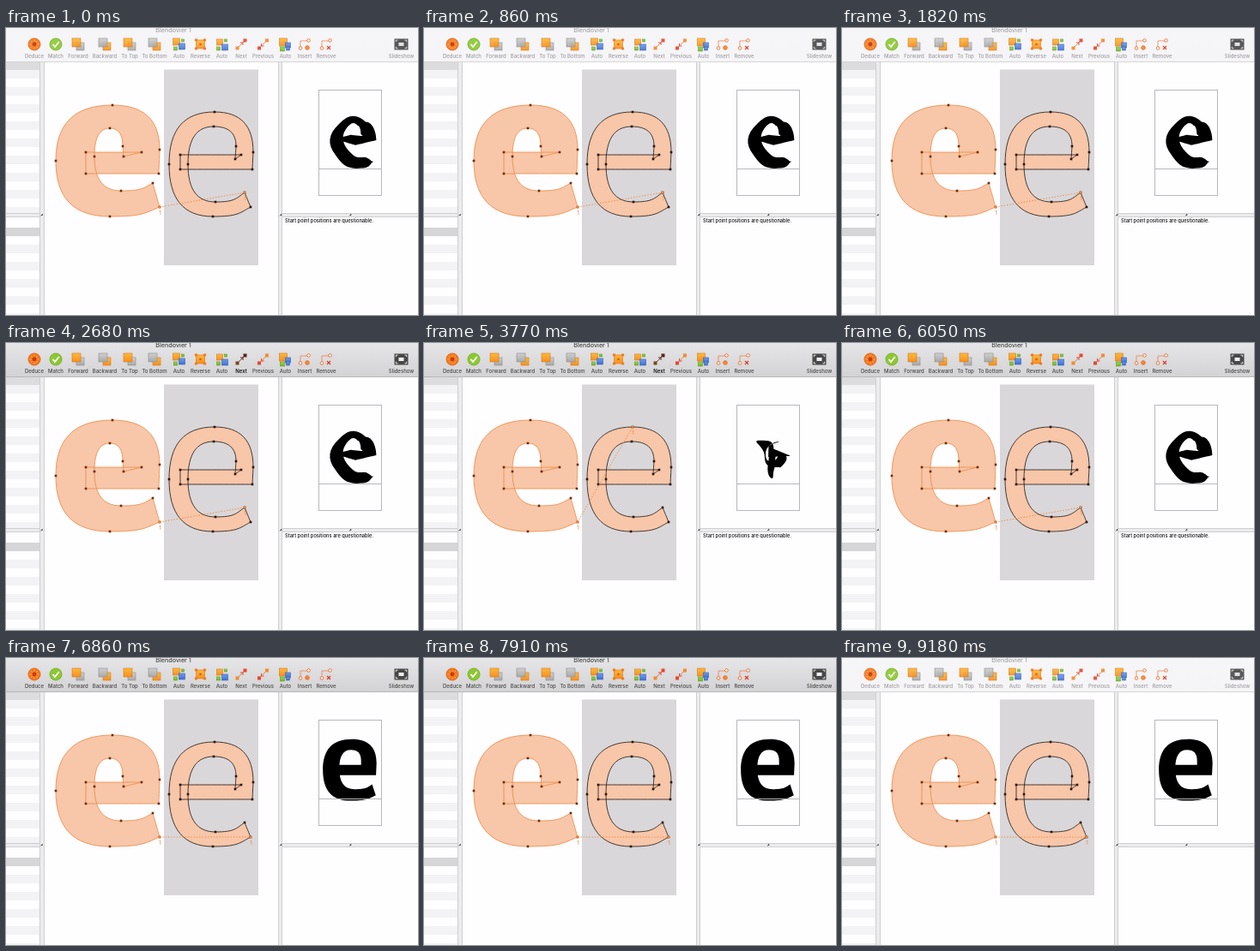
An HTML page with a canvas that plays this animation: 480 px wide and 335 px high, repeating every 9220 ms.

```html
<!DOCTYPE html>
<html lang="en">
<head>
<meta charset="utf-8">
<title>Glyph start points</title>
<style>
html, body { margin: 0; width: 100%; height: 100%; overflow: hidden; background: #fff; }
canvas { display: block; width: 480px; height: 335px; }
</style>
</head>
<body>
<canvas id="stage"></canvas>
<script>
const W = 480, H = 335, LOOP = 9220;
const canvas = document.getElementById('stage');
const ctx = canvas.getContext('2d');
const dpr = window.devicePixelRatio || 1;
canvas.width = W * dpr;
canvas.height = H * dpr;

// Window focus span, and the moments at which "Next" is released
const FOCUS = [2300, 8250];
const CLICKS = [2780, 3030, 3290, 3540, 3800, 4030, 4260, 4480, 4700, 4920, 5140, 5360, 5580, 5800, 6010, 6300];
const PRESS = 110;

// Tangent per node: h horizontal, v vertical, c corner
const TANGENTS = 'chvhvcccccvhvhc';
const CURVED = [0, 1, 2, 3, 10, 11, 12, 13];
const COUNT = TANGENTS.length;

const bold = makeGlyph([[179, 209], [121, 220], [58, 155], [124, 90], [179, 142], [178, 170], [93, 170],
  [93, 145], [158, 145], [137, 150], [136, 138], [121, 117], [103, 150], [134, 190], [171, 181]]);
const light = makeGlyph([[285, 209], [241, 220], [190, 159], [243, 98], [288, 145], [287, 165], [203, 165],
  [203, 148], [274, 148], [267, 153], [268, 138], [242, 115], [212, 159], [244, 203], [278, 192]]);

function handle(i, from, to) {
  const dx = to[0] - from[0], dy = to[1] - from[1];
  const [kx, ky] = { h: [0.67, 0], v: [0, 0.67], c: [0.3, 0.64] }[TANGENTS[i]];
  return [from[0] + dx * kx, from[1] + dy * ky];
}

// Each segment is [start, handle, handle, end]; straight ones have retracted handles
function makeGlyph(nodes) {
  return nodes.map((p, i) => {
    const j = (i + 1) % COUNT, q = nodes[j];
    return CURVED.includes(i) ? [p, handle(i, p, q), handle(j, q, p), q] : [p, p, q, q];
  });
}

function blend(shift) {
  const scale = 0.571, ox = 364.6, oy = 41;
  return bold.map((seg, i) => seg.map((a, n) => {
    const b = light[(i + shift) % COUNT][n];
    return [ox + scale * (a[0] - 48 + b[0] - 184) / 2, oy + scale * (a[1] + b[1]) / 2];
  }));
}

function trace(glyph) {
  ctx.beginPath();
  ctx.moveTo(...glyph[0][0]);
  for (const [, a, b, end] of glyph) ctx.bezierCurveTo(...a, ...b, ...end);
  ctx.closePath();
}

function rect(x, y, w, h, fill, stroke) {
  if (fill) { ctx.fillStyle = fill; ctx.fillRect(x, y, w, h); }
  if (stroke) { ctx.strokeStyle = stroke; ctx.strokeRect(x, y, w, h); }
}

function circle(x, y, r, fill, stroke) {
  ctx.beginPath();
  ctx.arc(x, y, r, 0, Math.PI * 2);
  if (fill) { ctx.fillStyle = fill; ctx.fill(); }
  if (stroke) { ctx.strokeStyle = stroke; ctx.stroke(); }
}

function line(points, color, width = 1) {
  ctx.beginPath();
  points.forEach(p => ctx.lineTo(...p));
  ctx.strokeStyle = color;
  ctx.lineWidth = width;
  ctx.stroke();
  ctx.lineWidth = 1;
}

function text(str, x, y, size, color, align = 'center') {
  ctx.font = `500 ${size}px Inter, Roboto, sans-serif`;
  ctx.textAlign = align;
  ctx.fillStyle = color;
  ctx.fillText(str, x, y);
}

const TILES = {
  orange: ['#ffb83a', '#f78f1e', '#cf7c20'],
  blue: ['#6c9cf0', '#3f6fd0', '#3860b0'],
  green: ['#9bd548', '#72b52a', '#5f9a24'],
  gray: ['#cfcfcf', '#a8a8a8', '#8c8c8c']
};

function tile(x, y, size, kind) {
  const [top, bottom, edge] = TILES[kind];
  const g = ctx.createLinearGradient(0, y, 0, y + size);
  g.addColorStop(0, top);
  g.addColorStop(1, bottom);
  ctx.lineWidth = 0.6;
  rect(x, y, size, size, g, edge);
  ctx.lineWidth = 1;
}

function stack(back, front) {
  tile(-2, -2, 9, back);
  tile(-7, -7, 10, front);
}

// Icons are drawn around their centre
const icons = {
  deduce() {
    circle(0, 0, 7, '#f4781e', '#e0681c');
    for (let a = 0; a < 8; a++) {
      const c = Math.cos(a * Math.PI / 4), s = Math.sin(a * Math.PI / 4);
      line([[c * 3.4, s * 3.4], [c * 5.6, s * 5.6]], '#ffb04a', 1);
    }
    circle(0, 0, 2.4, '#c83c14');
  },
  match() {
    circle(0, 0, 7, '#8cc832', '#7ab42c');
    line([[-3.5, 0], [-1, 3], [3.8, -3]], '#fff', 1.8);
  },
  forward() { stack('gray', 'orange'); },
  backward() { stack('orange', 'gray'); },
  toTop() { stack('gray', 'orange'); },
  toBottom() { stack('orange', 'gray'); },
  autoOrder() { tile(-7, -7, 8, 'orange'); tile(0, -1, 7, 'blue'); tile(-6, 3, 4, 'green'); tile(3, -6, 3, 'green'); },
  reverse() {
    tile(-5, -5, 10, 'orange');
    for (const x of [-5, 5]) for (const y of [-5, 5]) circle(x, y, 1.8, '#f07a1c');
    circle(0, 0, 1.3, '#d8581a');
  },
  autoStart() { tile(-6, -6, 7, 'orange'); tile(0, 0, 7, 'blue'); tile(-6, 3, 4, 'green'); tile(3, -6, 3, 'green'); },
  next(dark) {
    const red = dark ? '#5e2418' : '#e8452c';
    line([[-4, 4], [4, -4]], dark ? '#5a4a40' : '#d0805c');
    rect(-6.5, 2.5, 4, 4, dark ? '#7a4518' : '#f58a2a');
    rect(2.5, -6.5, 4, 4, red);
    line([[-1, -2], [2, -2], [2, 1]], red);
  },
  previous() {
    line([[-4, 4], [4, -4]], '#d0805c');
    rect(-6.5, 2.5, 4, 4, '#e8452c');
    rect(2.5, -6.5, 4, 4, '#f58a2a');
    line([[-2, -1], [-2, 2], [1, 2]], '#e8452c');
  },
  autoPoint() { tile(-7, -7, 9, 'orange'); tile(0, -2, 6, 'blue'); tile(-6, 3, 5, 'green'); tile(1, 3, 4, 'blue'); },
  bend() {
    line([[-5, 5], [-5, -4], [5, -4]], '#e89468');
    circle(-5, 4.5, 1.8, '#fff', '#ee7030');
    circle(4.5, -4.5, 1.8, '#fff', '#ee7030');
  },
  insert() { icons.bend(); circle(3, 4, 2.3, '#f58a2a', '#ee7030'); },
  remove() {
    icons.bend();
    line([[1, 2], [5, 6]], '#e23c28', 1.3);
    line([[5, 2], [1, 6]], '#e23c28', 1.3);
  },
  slideshow() {
    rect(-8, -6.5, 16, 13, '#484848');
    rect(-3, -2, 6, 4, '#f0f0f0');
    for (const x of [-1, 1]) for (const y of [-1, 1])
      line([[x * 4, y * 4.8], [x * 6.2, y * 4.8], [x * 6.2, y * 2.8]], '#e4e4e4');
  }
};

const TOOLS = [
  ['Deduce', 33, 'deduce'], ['Match', 58, 'match'], ['Forward', 84, 'forward'], ['Backward', 115, 'backward'],
  ['To Top', 144, 'toTop'], ['To Bottom', 173, 'toBottom'], ['Auto', 201.5, 'autoOrder'], ['Reverse', 226.5, 'reverse'],
  ['Auto', 251.5, 'autoStart'], ['Next', 274, 'next'], ['Previous', 299.5, 'previous'], ['Auto', 325.5, 'autoPoint'],
  ['Insert', 348, 'insert'], ['Remove', 373, 'remove'], ['Slideshow', 460.5, 'slideshow']
];

function drawToolbar(active, pressed) {
  const g = ctx.createLinearGradient(0, 0, 0, 39);
  g.addColorStop(0, active ? '#e6e5e7' : '#f6f5f7');
  g.addColorStop(1, active ? '#d3d2d4' : '#f5f4f6');
  rect(0, 0, W, 39, g);
  rect(0, 39, W, 1, active ? '#b8b8b8' : '#d6d6d6');
  text('Blendovier 1', 195, 5.3, 7.2, active ? '#444' : '#a4a2a6');
  for (const [label, x, icon] of TOOLS) {
    const dark = pressed && icon === 'next';
    ctx.save();
    ctx.translate(x, 19);
    ctx.globalAlpha = active ? 1 : 0.9;
    icons[icon](dark);
    ctx.restore();
    text(label, x, 35, 6, dark ? '#000' : active ? '#484848' : '#a09ea2');
  }
}

function drawPanels() {
  rect(0, 40, W, H - 40, '#fefdff');
  for (let y = 49; y < 216; y += 20) rect(0, y, 39, 10, '#f3f2f4');
  rect(0, 40, 39, 9, '#dcdbdd');
  for (let y = 253; y < H; y += 20) rect(0, y, 39, 10, '#f3f2f4');
  rect(0, 233, 39, 10, '#d6d5d7');
  rect(39, 40, 6, H - 40, '#ecebed');
  rect(317, 40, 5, H - 40, '#ecebed');
  rect(0, 216, 40, 5, '#ecebed');
  rect(322, 216, W - 322, 5, '#ecebed');
  for (const x of [39, 44, 317, 321]) rect(x, 40, 1, H - 40, '#cfced0');
  for (const y of [216, 220]) {
    rect(0, y, 39, 1, '#cfced0');
    rect(322, y, W - 322, 1, '#cfced0');
  }
  for (const x of [41.5, 320, 401]) {
    ctx.beginPath();
    ctx.moveTo(x - 1.5, 219.6);
    ctx.lineTo(x + 1.5, 218.4);
    ctx.lineTo(x + 1, 216.8);
    ctx.fillStyle = '#333';
    ctx.fill();
  }
}

function drawGlyph(glyph, stroke, node) {
  trace(glyph);
  ctx.fillStyle = '#f8c6a8';
  ctx.fill();
  ctx.strokeStyle = stroke;
  ctx.lineWidth = 0.8;
  ctx.stroke();
  ctx.lineWidth = 1;
  for (const [[x, y]] of glyph) rect(x - 1.3, y - 1.3, 2.6, 2.6, node);
}

function drawStart([x, y]) {
  rect(x - 1.3, y - 1.3, 2.6, 2.6, '#e8843c');
  text('1', x + 0.5, y + 9, 6, '#ee8a3c');
}

function drawEditor(shift) {
  rect(184, 48.5, 110, 228.5, '#d9d7da');
  drawGlyph(bold, '#ea8840', '#6a2c08');
  drawGlyph(light, '#1c1410', '#2c1408');
  const from = bold[0][0], to = light[shift][0];
  ctx.setLineDash([1.5, 1.8]);
  line([from, to], '#ee8a3c', 0.9);
  ctx.setLineDash([]);
  drawStart(from);
  drawStart(to);
}

function drawPreview(shift) {
  trace(blend(shift));
  ctx.fillStyle = '#000';
  ctx.fill();
  rect(364.5, 72.5, 73, 123, null, '#b8b7b9');
  line([[364, 164.5], [438, 164.5]], '#b8b7b9');
  if (shift) text('Start point positions are questionable.', 325, 227, 5.7, '#111', 'left');
}

function draw(t) {
  const active = t >= FOCUS[0] && t < FOCUS[1];
  const done = CLICKS.filter(c => c <= t).length;
  const pressed = CLICKS.some(c => t >= c - PRESS && t < c);
  const shift = (COUNT - 1 + done) % COUNT;
  ctx.setTransform(dpr, 0, 0, dpr, 0, 0);
  drawPanels();
  drawToolbar(active, pressed);
  drawEditor(shift);
  drawPreview(shift);
}

function tick() {
  draw(performance.now() % LOOP);
  requestAnimationFrame(tick);
}
tick();
</script>
</body>
</html>
```
